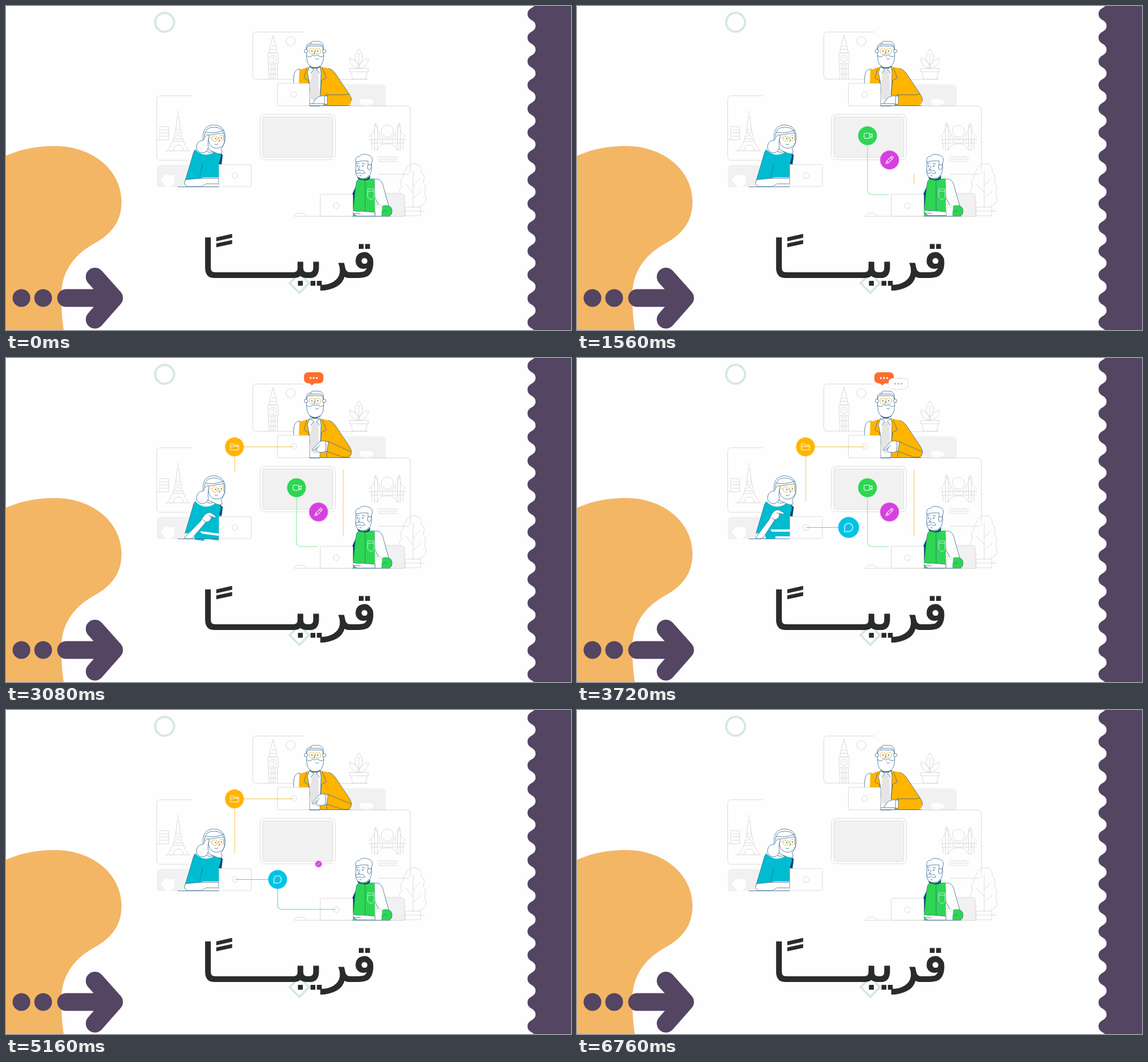
Recreate the animation shown at these times as an HTML page. Size 988 px wide and 567 px high, loop 6800 ms.

```html
<!DOCTYPE html>
<html lang="ar">
<head>
<meta charset="utf-8">
<title>قريبًا</title>
<style>
html, body { margin: 0; width: 100%; height: 100%; overflow: hidden; background: #fefefe; }
svg { display: block; width: 100%; height: 100%; }
text { font-family: "DejaVu Sans", sans-serif; font-size: 91px; fill: #2b2b2b; stroke: #2b2b2b; stroke-width: 1.8; }
.g { fill: none; stroke: #dadada; }
.w { fill: #fefefe; stroke: #dadada; }
.ink { fill: none; stroke: #356a92; stroke-width: .8; }
.skin { fill: #fefefe; stroke: #356a92; stroke-width: .8; }
.pale { fill: #f1f1f1; }
.navy { fill: #0c4a75; }
.gold { fill: none; stroke: #efc65c; stroke-width: 1.1; }
.ico { fill: none; stroke: #fff; stroke-width: 1.1; stroke-linejoin: round; stroke-linecap: round; }
.wire { fill: none; stroke-width: 1.1; stroke-dasharray: 1 2; stroke-dashoffset: 1; }
.a { animation: 6800ms linear infinite; }

.camWire { animation-name: camWire; }
@keyframes camWire { 0%, 8.4% { stroke-dashoffset: 1 } 20.6%, 64.1% { stroke-dashoffset: 0 } 70.1%, 100% { stroke-dashoffset: 1 } }
.docWire { animation-name: docWire; }
@keyframes docWire { 0%, 22% { stroke-dashoffset: 1 } 28%, 66.5% { stroke-dashoffset: 0 } 72.3%, 100% { stroke-dashoffset: 1 } }
.dirWire { animation-name: dirWire; }
@keyframes dirWire { 0% { stroke-dashoffset: 1 } 31% { stroke-dashoffset: 1; animation-timing-function: ease-in-out } 40%, 82.5% { stroke-dashoffset: 0 } 91%, 100% { stroke-dashoffset: 1 } }
.dirDrop { animation-name: dirDrop; }
@keyframes dirDrop { 0%, 43% { stroke-dashoffset: 1 } 48%, 79% { stroke-dashoffset: 0 } 84.4%, 100% { stroke-dashoffset: 1 } }
.chatWire { animation-name: chatWire; }
@keyframes chatWire { 0%, 48% { stroke-dashoffset: 1 } 53%, 92% { stroke-dashoffset: 0 } 98.5%, 100% { stroke-dashoffset: 1 } }
.chatDrop { animation-name: chatDrop; }
@keyframes chatDrop { 0%, 57% { stroke-dashoffset: 1 } 64%, 78% { stroke-dashoffset: 0 } 84.9%, 100% { stroke-dashoffset: 1 } }

.cam { animation-name: cam; }
@keyframes cam { 0%, 3.7% { transform: scale(0) } 7.2% { transform: scale(1.1) } 8.8%, 68.5% { transform: scale(1) } 71.5%, 100% { transform: scale(0) } }
.pen { animation-name: pen; }
@keyframes pen { 0%, 8.2% { transform: scale(0) } 11.8% { transform: scale(.98) } 13% { transform: scale(1.08) } 14.5%, 73.5% { transform: scale(1) } 77.2%, 100% { transform: scale(0) } }
.dir { animation-name: dir; }
@keyframes dir { 0%, 38.5% { transform: scale(0) } 41.5% { transform: scale(1.1) } 43%, 79% { transform: scale(1) } 84.7%, 100% { transform: scale(0) } }
.chat { animation-name: chat; }
@keyframes chat { 0%, 52% { transform: scale(0) } 54.7% { transform: scale(1.11) } 56.5%, 86% { transform: scale(1) } 90%, 100% { transform: scale(0) } }
.doc { animation-name: doc; }
@keyframes doc { 0%, 8.5% { transform: translateY(21px) } 11.5%, 20% { transform: none } 23%, 100% { transform: translateY(21px) } }

.say { animation-name: say; }
@keyframes say { 0%, 27.5% { transform: scale(0) } 31% { transform: scale(1.1) } 33.5% { transform: scale(1.05) } 35%, 43% { transform: none } 45.5% { transform: translate(-27px, -13px) } 46.5%, 63.5% { transform: translate(-26px, -12px) } 66.5%, 100% { transform: translate(-26px, -12px) scale(0) } }
.reply { animation-name: reply; }
@keyframes reply { 0%, 46.5% { transform: scale(0) } 49% { transform: scale(1.08) } 50.5%, 64% { transform: scale(1) } 67%, 100% { transform: scale(0) } }
.dot { animation-name: dot; }
@keyframes dot { 0%, 32.2% { opacity: 0 } 33%, 100% { opacity: 1 } }
.dot2 { animation-name: dot2; }
@keyframes dot2 { 0%, 34.2% { opacity: 0 } 35%, 100% { opacity: 1 } }
.dot3 { animation-name: dot3; }
@keyframes dot3 { 0%, 36.2% { opacity: 0 } 37%, 100% { opacity: 1 } }

.headA { animation-name: headA; }
@keyframes headA { 0%, 26% { transform: none } 29%, 64% { transform: translateY(-4px) } 67%, 100% { transform: none } }
.restA { animation-name: restA; }
@keyframes restA { 0%, 27% { opacity: 1 } 27.01%, 78% { opacity: 0 } 78.01%, 100% { opacity: 1 } }
.liftA { animation-name: liftA; transform-origin: 602px 168px; }
@keyframes liftA { 0%, 27% { opacity: 0; transform: rotate(-14deg) } 27.01% { opacity: 1; transform: rotate(-14deg) } 29.5%, 75.5% { opacity: 1; transform: none } 78% { opacity: 1; transform: rotate(-14deg) } 78.01%, 100% { opacity: 0; transform: rotate(-14deg) } }
.headB { animation-name: headB; }
@keyframes headB { 0%, 39.5% { transform: none } 43%, 71% { transform: translateY(-2px) } 74%, 100% { transform: none } }
.restB { animation-name: restB; }
@keyframes restB { 0%, 43% { opacity: 1 } 43.01%, 74% { opacity: 0 } 74.01%, 100% { opacity: 1 } }
.liftB { animation-name: liftB; transform-origin: 316px 314px; }
@keyframes liftB { 0%, 43% { opacity: 0; transform: rotate(32deg) } 43.01% { opacity: 1; transform: rotate(32deg) } 46%, 71% { opacity: 1; transform: none } 74% { opacity: 1; transform: rotate(32deg) } 74.01%, 100% { opacity: 0; transform: rotate(32deg) } }
.type { animation: type 340ms ease-in-out infinite; }
@keyframes type { 0%, 100% { transform: none } 50% { transform: translate(1px, -1px) } }
</style>
</head>
<body>
<svg viewBox="0 0 988 567" xmlns="http://www.w3.org/2000/svg">
<!-- backdrop -->
<path fill="#f3b665" d="M0 262C28 250 55 245 85 245C150 245 202 286 202 343C202 384 176 404 152 417C115 438 96 470 97 508Q97 545 101 567H0Z"/>
<g fill="#544563">
  <circle cx="27" cy="511" r="15.5"/><circle cx="65" cy="511" r="15.5"/>
  <path id="edge"/>
</g>
<g fill="none" stroke="#544563" stroke-linecap="round" stroke-linejoin="round">
  <path stroke-width="31" d="M105 511H185"/><path stroke-width="32" d="M155.500 474L188.500 511L155.500 548.500"/>
</g>
<g fill="none" stroke="#d6e7e8" stroke-width="4">
  <circle cx="277.300" cy="28.500" r="16.500"/><path d="M513 468L530 485L513 502L496 485Z"/>
</g>
<text id="word" x="648" y="475" text-anchor="end"></text>

<!-- top office -->
<g class="g">
  <path d="M520 45.500H438q-6.500 0-6.500 6.500V121q0 7 6.500 7H503M572 128.500H633"/>
  <circle cx="497.500" cy="61.500" r="8"/>
  <path d="M467 51L462 70H472ZM462 70L459.500 82H474.500L472 70M458 82.500H476V101H458ZM459.500 101V128M474.500 101V128M463.500 101V128M467 101V128M470.500 101V128M459.500 110H474.500M459.500 119H474.500M461 76H473M467 88V92L470 94"/>
  <circle cx="467" cy="92" r="6"/>
  <path d="M600.500 109.500H634V115H600.500ZM603 115L606 128H629L631.500 115M617 109V82M617 75Q607 87 612 97Q614 101 617 102Q620 101 622 97Q627 87 617 75M617 109Q616 96 601 91Q601 107 617 109Q618 96 634 91Q633 107 617 109"/>
</g>
<path class="pale" d="M575 137H656q8 0 8 8V175H575Z"/>
<path fill="#fefefe" d="M619 163H638V165Q644 164 643 169Q642 172 636 172L634 175H624Q619 171 619 163Z"/>
<path class="g" d="M474 174.500H664"/>
<path class="skin" d="M514 110Q503 111 503 126V140H514Z"/>
<path fill="#ffb400" d="M513 112L532 106H550L564 109Q573 112 578 121L600 154Q605 161 604 166Q602 175 594 175H531V136H512Z"/>
<path class="ink" d="M564 109Q573 112 578 121L600 154Q605 161 604 166"/>
<path class="skin" d="M531 106L527 116L531 136V175H549L551 116L549 106Z"/>
<path fill="#e5e5e5" d="M537 111H543L546 119L548 160L540 168L531 160L534 119Z"/>
<path class="ink" d="M531 106L538 111L533 118M549 106L543 111L548 118M526 108L521 126L529 130L531 150M553 108L560 126L552 130L549 155M561 153V174"/>
<g class="a headA">
  <path class="navy" d="M531 100Q540 112 550 100V106Q540 113 531 106Z"/>
  <path class="skin" d="M526 70L525.500 88Q526 108 540.500 108Q555 108 555.500 88L554 70Z"/>
  <circle class="skin" cx="524.500" cy="79" r="3"/><circle class="skin" cx="556.500" cy="79" r="3"/>
  <path class="skin" d="M525 76Q524 65 534 65Q532 61 540 62H547Q557 63 555 77Q554 69 550 67H532Q527 70 525 76Z"/>
  <g class="gold"><circle cx="535" cy="79" r="5"/><circle cx="545.500" cy="79" r="5"/></g>
  <circle class="navy" cx="535" cy="79" r=".9"/><circle class="navy" cx="545" cy="79" r=".9"/>
  <path class="ink" d="M540 79L539 85M525.500 87Q531 91 535 87Q538 84 540.500 88Q543 84 547 87Q551 91 555.500 87M541 92Q545 95 547 91"/>
</g>
<g class="a restA">
  <path fill="#ffb400" d="M561 155.500H600Q608 168 595 174.500H561Z"/>
  <path class="ink" d="M561 155.500H592L600 154M561 174.500H595"/>
  <path class="skin" d="M561 157Q548 156 542 162L537 170Q536 173 543 172H561Z"/>
  <path class="skin" d="M557 157.500H562V172H557ZM531 171H556V174.500H531Z"/>
</g>
<g class="a liftA">
  <path fill="#ffb400" d="M563 146L600 159Q608 172 597 174.500Q592 176 585 172L560 163Z"/>
  <path class="ink" d="M563 146L603 164M560 163L588 173Q603 177 604 165"/>
  <path class="skin" d="M564 147Q550 142 546 149L536 160Q536 163 540 160L545 156Q540 165 547 165Q556 166 561 163Z"/>
  <path class="ink" d="M545 156L549 152M559 146Q561 155 558 164"/>
</g>
<rect class="w" x="474.500" y="135.500" width="56" height="39" rx="2"/><circle class="w" cx="503" cy="155" r="5"/>
<path class="ink" d="M531 174.500H603"/>

<!-- left office -->
<g class="g">
  <path d="M325 157H270q-6.500 0-6.500 6.500V263q0 7 6.500 7H324"/>
  <path d="M301 183V194M299.500 194H302.500L305 216Q309 240 320 253.500H310Q309 243 301 243Q293 243 292 253.500H282Q293 240 297 216ZM296 216H306M293 233H309M291 237H311M297 219L306 231M305 219L295 231M278 253.500H322"/>
  <path d="M269 234V211H284.500V234ZM264 234H269M272 217H284M272 222H284M272 228H284"/>
</g>
<path class="pale" d="M264 317V286q0-8 8-8H322q6 0 6 6V317Z"/>
<path fill="#fefefe" d="M275 296H295V303Q294 317 285 317H280Q276 313 275 308Q270 308 272 300H275Z"/>
<path class="navy" d="M370 252L379 261L377 277H370Z"/>
<path fill="#00bcd0" d="M331 251Q350 270 371 250L376 262L372 277V300H344L336 305L313 307L326 263Q328 254 331 251Z"/>
<path class="ink" d="M313 307L326 263Q328 254 331 251M344 276L338 301"/>
<g class="a headB">
  <path class="skin" d="M352 242L349 253Q356 260 371 251V246Z"/>
  <path class="skin" d="M345 234Q342 210 362 208Q380 208 383 224Q385 240 376 250Q382 262 369 258L350 249Z"/>
  <path class="skin" d="M354 226Q352 247 367 249Q379 249 382 238L381 222Q361 225 354 226Z"/>
  <path class="skin" d="M352 225L355 227Q352 239 354 248Q349 260 339 256Q331 252 334 242Q338 234 345 235Q346 230 352 225Z"/>
  <path class="ink" d="M349 221Q365 224 381 217M347 229Q347 212 363 212Q377 212 380 221M365 242Q369 244 371 241M371 230L374 236L371 237"/>
  <g class="gold"><circle cx="365" cy="232" r="4.700"/><circle cx="376.500" cy="231" r="4.500"/><path d="M354 229L360 231"/></g>
  <circle class="navy" cx="366.500" cy="232" r=".9"/><circle class="navy" cx="376.500" cy="231" r=".9"/>
</g>
<g class="a restB">
  <path class="skin" d="M314 304L340 301.500H372V311H350L342 316H318Q309 313 314 304Z"/>
  <path class="w" d="M348 312H373V316H348Z"/>
</g>
<g class="a liftB">
  <path fill="#00bcd0" d="M326 290L345 268H372V316H330Z"/>
  <path fill="#fefefe" d="M338 300H372V304H341ZM347 312H372V316H347Z"/>
  <path class="skin" d="M312 315L336 283Q340 272 345 268Q350 264 355 267L362 271Q363 274 359 273L354 272Q355 281 346 283L326 314Q319 318 312 315Z"/>
  <path class="ink" d="M354 272L349 271M339 279L347 284"/>
</g>
<rect class="w" x="372.500" y="277.500" width="56.500" height="38.500" rx="2"/><circle class="w" cx="400.500" cy="296.500" r="5"/>
<path class="ink" d="M300 316.500H372"/>

<!-- screen -->
<rect class="w" x="444.500" y="189.500" width="131.500" height="79.500" rx="8"/>
<rect x="449" y="194" width="122.500" height="71" rx="4" class="pale" stroke="#dedede"/>

<!-- right office -->
<g class="g">
  <path d="M603 175H700q7 0 7 7V287.500q0 7-7 7H652"/>
  <circle cx="667" cy="219" r="10.500"/>
  <path d="M634 234H700M638 240H696M634 229Q643 225 646 207Q655 233 667 233Q679 233 688 207Q690 225 700 229M644.500 252V209L646.500 204L649.500 209V252ZM684.500 252V209L687.500 204L689.500 209V252ZM640 240V252M694 240V252M650 252Q653 241 667 241Q681 241 684 252M653 224V234M658 230V240M676 230V240M681 224V234M639 228V240M695 228V240"/>
  <path d="M650 264q3-2 6 0t6 0t6 0t6 0t6 0t5 0M650 268q3-2 6 0t6 0t6 0t6 0t6 0t5 0M650 272q3-2 6 0t6 0t6 0t6 0t6 0t5 0"/>
  <path d="M712 352V288M712 315L724 302M712 326L698 311M712 337L727 323M701 345Q688 345 692 332Q684 325 692 317Q687 304 694 300Q695 291 698 289Q703 275 714 276Q728 277 726 291Q735 297 729 308Q737 317 732 326Q740 347 722 350M698 367V352H725V367ZM690 359H733"/>
</g>
<path class="pale" stroke="#dadada" d="M640 368V328H690q7 0 7 7V368Z"/>
<path class="pale" d="M640 368V331H687q6 0 6 6V368Z"/>
<path class="w" d="M504 368Q507 362 514 362.500Q522 362 526 368"/>
<path class="skin" d="M644 303Q656 301 659 313L669 349L656 356L645 335Z"/>
<path class="navy" d="M612 315L606 328V360H613Z"/>
<path fill="#2dd653" d="M613 307Q615 303 620 302H644L645 335V368H606L611 320Z"/>
<path class="ink" d="M628 304V362M611 320L613 307Q615 303 620 302"/>
<path fill="none" stroke="#b8f3c7" d="M632.500 320H643.500V333Q643 338 638 338Q633 338 632.500 333ZM632.500 324H643.500"/>
<path fill="#2dd653" d="M655 352Q660 347 668 349Q676 352 675 361Q674 368 666 368H652Z"/>
<path class="ink" d="M657 362Q660 357 666 359M668 349Q676 352 675 361Q674 368 666 368"/>
<g>
  <path class="navy" d="M615 298Q625 310 637 296L636 303Q626 308 615 302Z"/>
  <path class="skin" d="M612 272L611.500 290Q612 302 624 302Q636 301 639 288V268Z"/>
  <path class="skin" d="M612 273Q609 264 618 263Q623 257 634 261Q643 264 640 273L638 279L633 277V271Q622 270 612 273Z"/>
  <path class="skin" d="M632 279Q639 275 639 282Q637 288 633 286Z"/>
  <path class="skin" d="M611 291Q614 286 619 288Q624 286 628 292Q622 295 619 291Q615 295 611 291Z"/>
  <path class="ink" d="M619 279L616 286H619M612 276L617 275M622 275L628 277M618 297H622"/>
  <circle class="navy" cx="614.500" cy="280" r="1"/><circle class="navy" cx="624" cy="280" r="1"/>
</g>
<g class="type">
  <path class="skin" d="M606 358Q614 360 622 359L645 361V367.500H614Q607 365 606 358Z"/>
  <path class="ink" d="M608 363L620 364"/>
</g>
<path class="w" d="M645 348.500H658L656 368H647Z"/><path class="g" d="M645.500 352H657.500"/>
<g transform="translate(578 309)">
  <g class="a doc">
    <path fill="#ffb400" d="M2 0H16L23 7V21H0V2Q0 0 2 0Z"/><path fill="#f28c0f" d="M16 0L23 7H16Z"/>
  </g>
</g>
<rect class="w" x="549.500" y="329.500" width="57" height="38.500" rx="2"/><circle class="w" cx="577.500" cy="349.500" r="5"/>
<path class="g" d="M504 368H698"/><path class="ink" d="M606 368H672"/>

<!-- links -->
<path class="wire a camWire" pathLength="1" stroke="#86e6a6" d="M508 227V322q0 8 8 8H545"/>
<path class="wire a docWire" pathLength="1" stroke="#f4c982" d="M589.500 312V195"/>
<path class="wire a dirWire" pathLength="1" stroke="#f2c558" d="M503 155.500H400"/>
<path class="wire a dirDrop" pathLength="1" stroke="#f7cd62" d="M400 155V251"/>
<path class="wire a chatWire" pathLength="1" stroke="#67cad4" d="M401 296.500H475"/>
<path class="wire a chatDrop" pathLength="1" stroke="#67cad4" d="M475 297V341q0 8 8 8H577"/>

<!-- badges -->
<g transform="translate(508 227)"><g class="a cam">
  <circle r="16.500" fill="#2dd653"/><path class="ico" d="M-4.500-4.500H2.500Q4-4.500 4-3V3Q4 4.500 2.500 4.500H-4.500Q-6 4.500-6 3V-3Q-6-4.500-4.500-4.500ZM4-1L8-3.500V3.500L4 1"/>
</g></g>
<g transform="translate(546.500 269.500)"><g class="a pen">
  <circle r="16.500" fill="#d540df"/><path class="ico" transform="rotate(45)" d="M-2-6Q-2-8 0-8Q2-8 2-6V5L0 9L-2 5ZM-2-4H2M-2 5H2"/>
</g></g>
<g transform="translate(399.500 155.500)"><g class="a dir">
  <circle r="16.500" fill="#ffb400"/><path class="ico" d="M-7 5V-5.500H-2L0-3H7V5.500H-7M-7-1H7"/>
</g></g>
<g transform="translate(475 296.500)"><g class="a chat">
  <circle r="16.500" fill="#00c3e6"/><path class="ico" d="M-6.500 6.500V0A6.500 6.500 0 1 1 0 6.500Z"/>
</g></g>

<!-- speech -->
<g transform="translate(563 47)"><g class="a say">
  <path fill="#ff6d2d" d="M-9-10H9Q17-10 17-2V2Q17 9 9 9.500H1L-3 13L-7 9.500H-9Q-17 9-17 2V-2Q-17-10-9-10Z"/>
  <g fill="#fff"><circle class="a dot" cx="-5.500" r="1.700"/><circle class="a dot2" r="1.700"/><circle class="a dot3" cx="5.500" r="1.700"/></g>
</g></g>
<g transform="translate(562 45)"><g class="a reply">
  <path class="w" d="M-9-9.500H9Q17-9.500 17-2V2Q17 9 9 9.500H0L-4 13L-6 9.500H-9Q-17 9-17 2V-2Q-17-9.500-9-9.500Z"/>
  <g fill="#b5b5b5"><circle cx="-5.500" r="1.600"/><circle r="1.600"/><circle cx="5.500" r="1.600"/></g>
</g></g>
</svg>
<script>
// Scalloped strip on the right
const pitch = 41.5, half = pitch / 2;
let d = `M988 -10H926V${14 - half}`;
for (let i = 0; i < 14; i++) {
  const y = 14 + i * pitch;
  d += `C926 ${y - 9} 912 ${y - 12} 912 ${y}C912 ${y + 12} 926 ${y + 9} 926 ${y + half}`;
}
document.getElementById('edge').setAttribute('d', d + 'H988Z');

// Lengthen the word with kashidas until it is about as wide as the design
const word = document.getElementById('word');
const setWord = n => {
  word.textContent = 'قريب' + 'ـ'.repeat(n) + 'ًا';
  return Math.abs(word.getComputedTextLength() - 304);
};
let count = 1;
while (count < 12 && setWord(count + 1) < setWord(count)) count++;
setWord(count);
</script>
</body>
</html>
```
